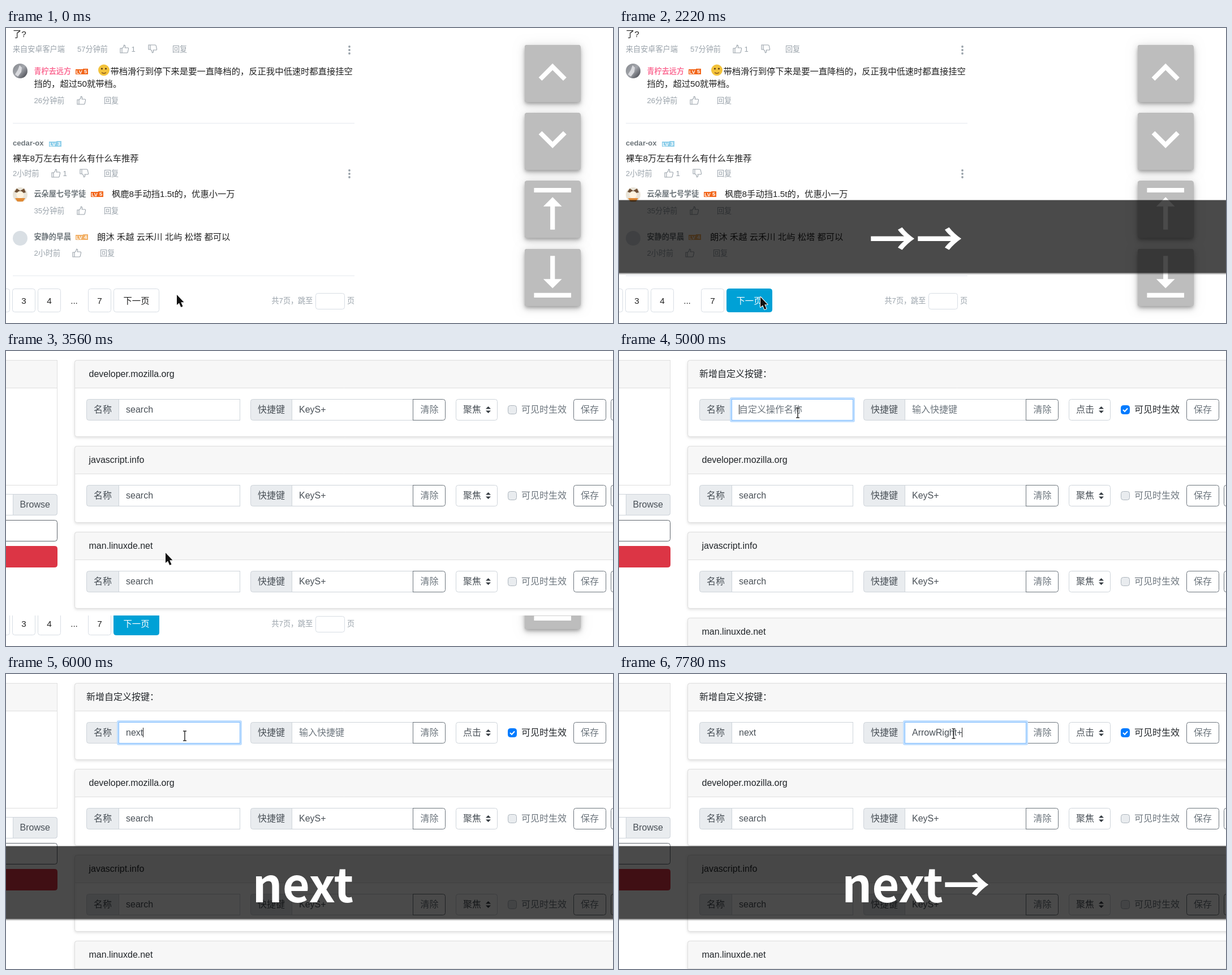
These frames come from a looping animation (1073 by 522 pixels, 8 s). An HTML page with a canvas:

```html
<!DOCTYPE html>
<html lang="zh-CN">
<head>
<meta charset="utf-8">
<title>快捷键演示</title>
<style>
  html, body { margin: 0; width: 100%; height: 100%; overflow: hidden; background: #fff; }
  canvas { display: block; }
</style>
</head>
<body>
<canvas id="stage" width="1073" height="522"></canvas>
<script>
const W = 1073, H = 522, LOOP = 8000, STEP = 110;
const ctx = document.getElementById('stage').getContext('2d');
const SANS = '"Liberation Sans", "Noto Sans CJK SC", sans-serif';
const CJK = '"Noto Sans CJK SC", "Noto Sans CJK", sans-serif';
const BODY = 15.3, META = 13.12, FORM = 16;
const INK = '#222', MUTED = '#99a2aa', NAME = '#6d757a';
const BORDER = '#ced4da', FIELD = '#495057', GREY = '#6c757d';

const THUMB = new Path2D('M1 7h3v8H1zM4 7.5 7 4.2 7.4 1.4C9.6.9 10.2 3 9.3 6h5c1 0 1.4 .9 1.2 2L14.2 13.8c-.3 .9-.8 1.2-1.6 1.2H4');
const POINTER = new Path2D('M0 0V18L4 14.5 7.3 22 10.5 20.6 7.3 13.3H12.5Z');
const SIDE_ICONS = [
  'M12 8l-6 6 1.41 1.41L12 10.83l4.59 4.58L18 14z',
  'M7.41 7.84L12 12.42l4.59-4.58L18 9.25l-6 6-6-6z',
  'M8 11h3v10h2V11h3l-4-4-4 4zM4 3v2h16V3H4z',
  'M16 13h-3V3h-2v10H8l4 4 4-4zM4 19v2h16v-2H4z'
].map(d => new Path2D(d));

function text(s, x, cy, size, color, weight = '', align = 'left', family = SANS) {
  ctx.font = `${weight} ${size}px ${family}`;
  ctx.textAlign = align;
  ctx.fillStyle = color;
  ctx.fillText(s, x, Math.round(cy + size * 0.36));
}

function rect(x, y, w, h, fill, color) {
  if (fill) { ctx.fillStyle = fill; ctx.fillRect(x, y, w, h); }
  if (color) { ctx.strokeStyle = color; ctx.lineWidth = 1; ctx.strokeRect(x + .5, y + .5, w - 1, h - 1); }
}

function box(x, y, w, h, r, fill, color) {
  ctx.beginPath();
  ctx.roundRect(x + .5, y + .5, w - 1, h - 1, r);
  if (fill) { ctx.fillStyle = fill; ctx.fill(); }
  if (color) { ctx.strokeStyle = color; ctx.lineWidth = 1; ctx.stroke(); }
}

function disc(x, y, r, color) {
  ctx.beginPath();
  ctx.arc(x, y, r, 0, Math.PI * 2);
  ctx.fillStyle = color;
  ctx.fill();
}

function poly(points, color, width) {
  ctx.beginPath();
  points.forEach(([x, y]) => ctx.lineTo(x, y));
  if (width) { ctx.strokeStyle = color; ctx.lineWidth = width; ctx.stroke(); }
  else { ctx.fillStyle = color; ctx.fill(); }
}

// ---- comment page ----

function thumb(x, cy, down) {
  ctx.save();
  ctx.translate(x + 8, cy);
  if (down) ctx.scale(1, -1);
  ctx.translate(-8, -8);
  ctx.strokeStyle = MUTED;
  ctx.lineWidth = 1.1;
  ctx.stroke(THUMB);
  ctx.restore();
}

function level(n, x, cy, color) {
  rect(x, cy - 4, 14, 9, color);
  rect(x + 13, cy - 5, 9, 10, color);
  text('LV', x + 1, cy + .5, 9, '#fff', 'bold');
  text(n, x + 15, cy, 9.5, '#fff', 'bold');
}

function dots(cy) {
  for (const d of [-6, 0, 6]) disc(607, cy + d, 1.9, MUTED);
}

function meta(time, timeX, likeX, replyX, cy, likes, dislikeX) {
  text(time, timeX, cy, META, MUTED);
  thumb(likeX, cy);
  if (likes) text(likes, likeX + 20.5, cy, META, MUTED);
  if (dislikeX) thumb(dislikeX, cy, true);
  text('回复', replyX, cy, META, MUTED);
}

function avatars() {
  const g = ctx.createLinearGradient(14, 66, 36, 86);
  g.addColorStop(0, '#8b8e93');
  g.addColorStop(.5, '#a4a7ad');
  g.addColorStop(1, '#4c4e55');
  disc(25, 76, 13, g);
  poly([[24, 66], [28, 70], [27, 78], [21, 86], [16, 82], [21, 74]], '#d9dade');

  disc(25, 295, 13, '#e9e4d8');
  poly([[15, 290], [19, 284], [25, 288], [32, 284], [35, 291], [25, 293]], '#6f5137');
  disc(25, 295, 6.5, '#fff3df');
  poly([[16, 301], [34, 301], [30, 307], [20, 307]], '#e08a35');

  disc(25, 372, 13, '#d9dfe4');
}

function pageButton(label, x, w, active) {
  box(x, 461, w, 42, 4, active ? '#00a1d6' : '#fff', active ? '#00a1d6' : '#d7dde4');
  text(label, x + w / 2, 482.5, BODY, active ? '#fff' : INK, '', 'center');
}

function sideButtons() {
  const shadows = [[3, 5, .2], [6, 10, .14], [1, 18, .12]];
  SIDE_ICONS.forEach((icon, i) => {
    const y = 30 + i * 120.3;
    ctx.save();
    ctx.beginPath();
    ctx.roundRect(917, y, 98.5, 101, 4);
    ctx.fillStyle = '#bdbdbd';
    for (const [offset, blur, alpha] of shadows) {
      ctx.shadowColor = `rgba(0,0,0,${alpha})`;
      ctx.shadowBlur = blur;
      ctx.shadowOffsetY = offset;
      ctx.fill();
    }
    ctx.restore();
    ctx.save();
    ctx.translate(917, y);
    ctx.scale(4.1, 4.1);
    ctx.fillStyle = '#fff';
    ctx.fill(icon);
    ctx.restore();
  });
}

function commentPage(hover) {
  rect(0, 0, W, H, '#fff');
  text('了?', 12, 10.5, BODY, INK);
  text('来自安卓客户端', 12, 37, META, MUTED);
  meta('57分钟前', 126, 201, 294, 37, '1', 251);
  dots(39);

  avatars();
  text('青柠去远方', 49.5, 76, META, '#fb7299', 'bold');
  level('5', 123, 77, '#f2661a');
  disc(173, 74.5, 10, '#f3c33c');
  disc(169.5, 72, 1.6, '#5a3a16');
  disc(176.5, 72, 1.6, '#5a3a16');
  poly([[169, 79], [173, 80.5], [177, 79]], '#8a5a1c', 1.5);
  text('带档滑行到停下来是要一直降档的，反正我中低速时都直接挂空', 184.5, 76, BODY, INK);
  text('挡的，超过50就带档。', 49.5, 98, BODY, INK);
  meta('26分钟前', 49.5, 125, 173, 128);
  rect(12, 168, 604, 1, '#e5e9ef');

  text('cedar-ox', 12, 203.5, META, NAME, 'bold');
  level('3', 76, 205, '#8fcfea');
  text('裸车8万左右有什么有什么车推荐', 12, 230, BODY, INK);
  meta('2小时前', 12, 80, 173, 257, '1', 130);
  dots(258);

  text('云朵屋七号学徒', 49.5, 293, META, NAME, 'bold');
  level('5', 150, 294, '#f2661a');
  text('枫鹿8手动挡1.5t的，优惠小一万', 187, 293, BODY, INK);
  meta('35分钟前', 49.5, 125, 173, 323);

  text('安静的早晨', 49.5, 369, META, NAME, 'bold');
  level('4', 123, 370, '#f2b168');
  text('朗沐 禾越 云禾川 北屿 松塔 都可以', 161, 369, BODY, INK);
  meta('2小时前', 49.5, 117, 166, 398);
  rect(12, 438, 604, 1, '#e5e9ef');

  pageButton('', -34, 41);
  pageButton('3', 11, 41);
  pageButton('4', 56, 41);
  text('...', 120.5, 482.5, BODY, INK, '', 'center');
  pageButton('7', 145, 41);
  pageButton('下一页', 190, 81, hover);
  text('共7页，跳至', 469.5, 482.5, META, MUTED);
  box(547, 469, 52, 29, 4, '#fff', '#d7dde4');
  text('页', 603, 482.5, META, MUTED);
  sideButtons();
}

// ---- settings page ----

function field(x, y, w, value, placeholder, focused, caret) {
  if (focused) {
    ctx.beginPath();
    ctx.roundRect(x - 3, y - 3, w + 6, 44, 3);
    ctx.fillStyle = '#bfdeff';
    ctx.fill();
  }
  rect(x, y, w, 38, '#fff', focused ? '#80bdff' : BORDER);
  text(value || placeholder, x + 13, y + 18.5, FORM, value ? FIELD : GREY);
  if (focused && caret) {
    rect(Math.round(x + 13 + (value ? ctx.measureText(value).width : 0)), y + 10, 1, 17, INK);
  }
}

function outlineButton(label, x, y) {
  box(x, y, 58, 38, 4, '#fff', GREY);
  text(label, x + 13, y + 18.5, FORM, GREY);
}

function addon(label, x, y, w) {
  box(x, y, w, 38, [4, 0, 0, 4], '#e9ecef', BORDER);
  text(label, x + 13, y + 18.5, FORM, FIELD);
}

function card(y, title, o) {
  ctx.save();
  ctx.shadowColor = 'rgba(0,0,0,.1)';
  ctx.shadowBlur = 4;
  ctx.shadowOffsetY = 2;
  box(121, y, 1000, 136, 4, '#fff', '#dfdfdf');
  ctx.restore();
  box(121, y, 1000, 50, [4, 4, 0, 0], '#f7f7f7', '#dfdfdf');
  text(title, o.fresh ? 142 : 146.5, y + 24.5, FORM, '#212529');

  const top = y + 69;
  addon('名称', 142, top, 58);
  addon('快捷键', 432, top, 74);
  box(719, top, 58, 38, [0, 4, 4, 0], '#fff', GREY);
  text('清除', 732.5, top + 18.5, FORM, GREY);
  field(199, top, 215, o.name, '自定义操作名称', o.focus === 'name', o.caret);
  field(505, top, 215, o.key, '输入快捷键', o.focus === 'key', o.caret);
  if (o.focus !== 'key') rect(719, top, 1, 38, GREY);

  box(795, top, 74, 38, 4, '#fff', BORDER);
  text(o.fresh ? '点击' : '聚焦', 808, top + 18.5, FORM, FIELD);
  poly([[848, top + 17.5], [852.5, top + 13], [857, top + 17.5]], '#343a40');
  poly([[848, top + 20.5], [852.5, top + 25], [857, top + 20.5]], '#343a40');

  box(887, top + 11, 16, 16, 4, o.fresh ? '#007bff' : '#e9ecef', o.fresh ? '#007bff' : '#adb5bd');
  if (o.fresh) poly([[891, top + 19], [894, top + 22], [899, top + 16.5]], '#fff', 2);
  text('可见时生效', 911, top + 18.5, FORM, o.fresh ? '#212529' : GREY);
  outlineButton('保存', 1003, top);
  if (!o.fresh) outlineButton('', 1069, top);
}

function leftPanel() {
  rect(-10, 16, 101, 222, '#fff', '#dfdfdf');
  rect(-10, 16, 101, 50, '#f7f7f7', '#dfdfdf');
  box(-40, 253, 131, 38, 4, '#fff', BORDER);
  box(12, 253, 79, 38, [0, 4, 4, 0], '#e9ecef', BORDER);
  text('Browse', 24.5, 271.5, FORM, FIELD);
  box(-40, 299, 131, 38, 4, '#fff', '#5f666d');
  box(-40, 345, 131, 38, 4, '#dc3545', '#dc3545');
}

function settingsPage(form) {
  rect(0, 0, W, H, '#fff');
  leftPanel();
  let y = 16;
  if (form) { card(y, '新增自定义按键：', { fresh: true, ...form }); y += 152; }
  for (const site of ['developer.mozilla.org', 'javascript.info', 'man.linuxde.net']) {
    card(y, site, { name: 'search', key: 'KeyS+' });
    y += 152;
  }
}

// ---- overlays ----

function keyBand(keys) {
  rect(0, 304.5, W, 128.5, 'rgba(0,0,0,.71)');
  [.5, .32, .15, .06].forEach((a, i) => rect(0, 433 + i, W, 1, `rgba(0,0,0,${a})`));
  ctx.font = `bold 83px ${CJK}`;
  ctx.textAlign = 'center';
  ctx.fillStyle = '#fff';
  ctx.fillText(keys, 525, 403.5);
}

function pointer([x, y]) {
  ctx.save();
  ctx.translate(x, y);
  ctx.lineJoin = 'round';
  ctx.strokeStyle = '#fff';
  ctx.lineWidth = 2;
  ctx.stroke(POINTER);
  ctx.fillStyle = '#111';
  ctx.fill(POINTER);
  ctx.restore();
}

function beam([x, y]) {
  poly([[x, y - 8], [x, y + 9]], '#222', 1.4);
  for (const end of [y - 8, y + 9]) poly([[x - 3, end], [x + 3, end]], '#222', 1.4);
}

// ---- timeline ----

// Progress of a move that is sampled once per STEP; the first sample already moves.
function stepped(t, start, steps) {
  if (t < start) return 0;
  const p = Math.min(1, (Math.floor((t - start) / STEP) + 1) / steps);
  return p * p * (3 - 2 * p);
}

const mix = (a, b, p) => a + (b - a) * p;
const curve = (a, c, b, p) => mix(mix(a, c, p), mix(c, b, p), p);

function latest(t, entries) {
  let value = '';
  for (const [at, v] of entries) if (t >= at) value = v;
  return value;
}

function drawComments(t) {
  const p = stepped(t, 1670, 6);
  const at = t >= 2670 ? [617, 449] : [mix(302, 250, p), mix(472, 476, p)];
  commentPage(at[0] < 271 || t >= 2670);
  if (t >= 440) keyBand(t < 1000 ? '→' : '→→');
  pointer(at);
}

function drawLoading(t) {
  commentPage(true);
  ctx.save();
  ctx.beginPath();
  ctx.rect(0, 0, W, t < 3670 ? 468 : H);
  ctx.clip();
  settingsPage();
  ctx.restore();
  pointer([282, 357]);
}

function drawForm(t) {
  const typed = latest(t, [[5220, 'n'], [5330, 'ne'], [5560, 'nex'], [6000, 'next']]);
  const arrow = t >= 7780;
  const caretOff = [[4450, 5000], [6220, 6670], [7560, 7780]].some(([a, b]) => t >= a && t < b);
  settingsPage({
    name: typed,
    key: arrow ? 'ArrowRight+' : '',
    focus: t < 3890 ? '' : t < 7110 ? 'name' : 'key',
    caret: !caretOff
  });
  if (typed) keyBand(typed + (arrow ? '→' : ''));

  const up = stepped(t, 4110, 5), across = stepped(t, 6670, 5);
  const x = across ? mix(316, 591.5, across) : curve(282, 400, 316, up);
  const y = across ? mix(109, 105, across) : curve(357, 220, 109, up);
  const overField = y < 124 && (x > 199 && x < 414 || x > 505 && x < 720);
  (overField ? beam : pointer)([x, y]);
}

let origin;
function frame(now) {
  origin ??= now;
  const t = (now - origin) % LOOP;
  (t < 3560 ? drawComments : t < 3780 ? drawLoading : drawForm)(t);
  requestAnimationFrame(frame);
}
requestAnimationFrame(frame);
</script>
</body>
</html>
```
